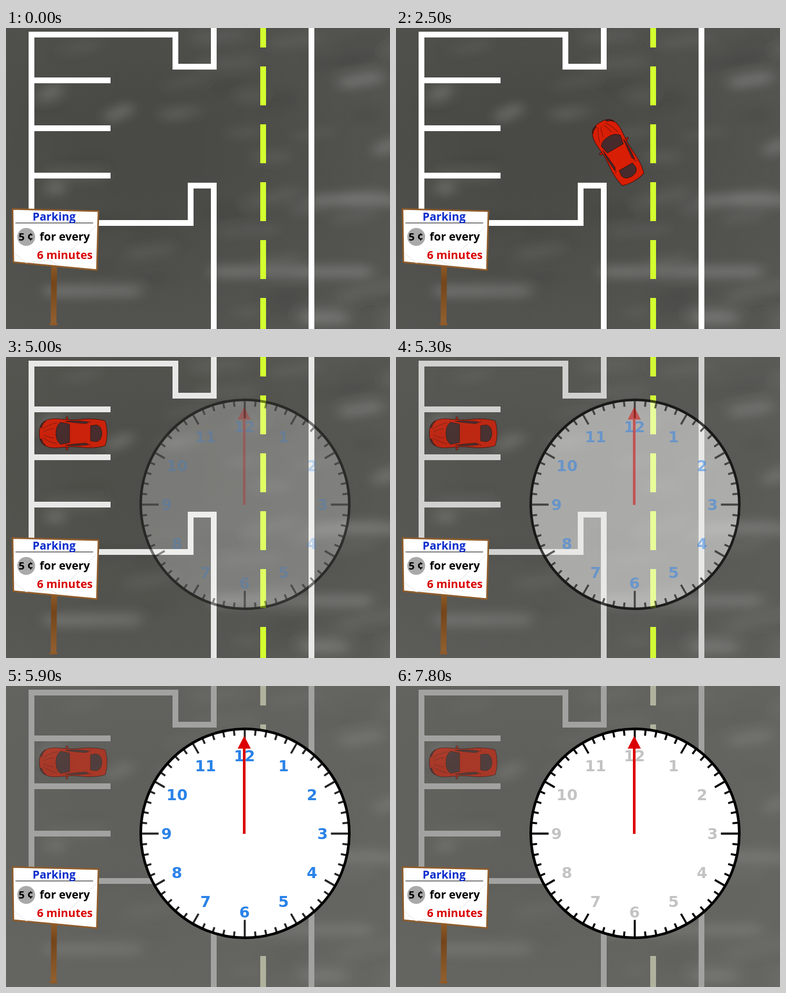
Write an HTML page that moves like this. It is 731x572 px and loops after 8 s.

```html
<!DOCTYPE html>
<html lang="en">
<head>
<meta charset="utf-8">
<title>Parking clock</title>
<style>
html, body { margin: 0; width: 100%; height: 100%; overflow: hidden; background: #4c4c48; }
/* --p: clock fades in; --line, --late: eased forms of it; --q: numbers turn grey */
svg { --p: 0; --line: 0; --late: 0; --q: 0; display: block; width: 100vw; height: 100vh; }

.dim { opacity: calc(var(--p) * .5); }
.lines { fill: none; stroke-width: 11; stroke: color-mix(in srgb, #a2a2a0 calc(var(--p) * 100%), #fff); }
.dashes { stroke-width: 11; stroke-dasharray: 74 36; stroke: color-mix(in srgb, #b0b29e calc(var(--late) * 100%), #d4ff2e); }
.body { opacity: calc(1 - var(--p) * .4); }
.fade { opacity: var(--p); }
.dial { opacity: var(--line); stroke: #000; }
.ticks { stroke-width: 3.8; opacity: calc(.85 + var(--q) * .15); }
.numbers { font: bold 29px "DejaVu Sans", sans-serif; text-anchor: middle; fill: color-mix(in srgb, #c3c3c3 calc(var(--q) * 100%), #2a82e8); }
.sign { font: bold 21.4px "Open Sans", "Noto Sans", sans-serif; }
</style>
</head>
<body>
<svg id="stage" viewBox="0 0 731 572" preserveAspectRatio="none">
  <defs>
    <filter id="soft" filterUnits="userSpaceOnUse" x="-60" y="-60" width="851" height="692">
      <feGaussianBlur stdDeviation="13 9"/>
    </filter>
    <radialGradient id="asphalt" cx=".35" cy=".38" r=".75">
      <stop offset=".2" stop-color="#494945"/>
      <stop offset="1" stop-color="#555552"/>
    </radialGradient>
    <linearGradient id="wood" x2="0" y2="1">
      <stop offset="0" stop-color="#8f5a26"/>
      <stop offset=".3" stop-color="#74451a"/>
      <stop offset="1" stop-color="#93602f"/>
    </linearGradient>
  </defs>

  <rect width="731" height="572" fill="url(#asphalt)"/>
  <g filter="url(#soft)" fill="none" stroke="#fff" stroke-linecap="round">
    <g id="streaks"/>
    <path d="M85 500H245 M400 463H685 M595 327H740 M575 552H640 M645 104L705 94 M712 232L735 220
      M200 168L230 154 M75 128L95 117 M88 305H100" stroke-width="24" opacity=".17"/>
  </g>
  <rect class="dim" width="731" height="572" fill="#767672"/>

  <path class="lines" d="M48.5 370.5V12.5H322.5V73.5H395.5V0 M48.5 370.5H351.5V299.5H395.5V572
    M54 99.5H199 M54 190.5H199 M54 280.5H199 M581.5 0V572"/>
  <path class="dashes" d="M489.5 -37V572"/>

  <g id="car"><g class="body" stroke-linejoin="round">
    <g fill="#d81e05" stroke="#3c0d08">
      <path d="M-24 -9L-31.5 -11L-31 -14L-23 -13Z M24 -9L31.5 -11L31 -14L23 -13Z"/>
      <path d="M0 -64.5C11 -64.5 20 -62 24 -53C28 -44 28.5 -36 27 -24L25.5 -4C25.5 10 28 22 27.5 34
        Q27 50 23.5 61Q12 64.5 0 64.5Q-12 64.5 -23.5 61Q-27 50 -27.5 34C-28 22 -25.5 10 -25.5 -4
        L-27 -24C-28.5 -36 -28 -44 -24 -53C-20 -62 -11 -64.5 0 -64.5Z"/>
    </g>
    <g fill="#472a2b" stroke="#2a0d0b" stroke-width=".8">
      <path d="M-21 -24Q-15 -33 0 -33Q15 -33 21 -24L17.5 -7H-17.5Z"/>
      <path d="M-14.500 33H14.500L16 44Q14 54 0 54.500Q-14 54 -16 44Z"/>
      <path id="glass" d="M22.5 -15Q25 4 21.5 30L18.5 24Q19.5 6 22.5 -15Z"/>
      <use href="#glass" transform="scale(-1 1)"/>
      <path id="lamp" d="M11 -62.5Q20 -61 23 -52L20 -56Q16 -59 11 -60Z"/>
      <use href="#lamp" transform="scale(-1 1)"/>
    </g>
    <g fill="none" stroke="#6d120b" stroke-width=".9">
      <path id="seams" d="M20 -31Q16 -48 8 -58 M9 -37Q8 -48 3 -56 M19 9L25 10 M19 31L25 34"/>
      <use href="#seams" transform="scale(-1 1)"/>
    </g>
  </g></g>

  <g class="sign">
    <path d="M86 450H97L96 564H85Z" fill="url(#wood)"/>
    <ellipse cx="90.5" cy="563" rx="8.5" ry="2.5" fill="#8d5a2a"/>
    <path d="M12.5 344L176 348L173 460L14 445Z" fill="#fff" stroke="#8f5c2a" stroke-width="3" stroke-linejoin="round"/>
    <path d="M173 374L122 424 M16 428L38 446L82 441L100 451" fill="none" stroke="#ececec" stroke-width="1.5"/>
    <path d="M18 370.5H166" stroke="#000"/>
    <circle cx="38.5" cy="397" r="17" fill="#a9a9a9"/>
    <text x="50.5" y="366" fill="#0a2ccc">Parking</text>
    <text x="24" y="404" font-size="20">5 ¢</text>
    <text x="64" y="404">for every</text>
    <text x="59" y="439" fill="#d80000">6 minutes</text>
  </g>

  <circle class="fade" cx="455" cy="280" r="196.5" fill="#fff"/>
  <g class="dial">
    <circle cx="455" cy="280" r="198.5" fill="none" stroke-width="5"/>
    <g class="ticks" id="ticks"/>
  </g>
  <g class="fade"><g class="numbers" id="numbers"/></g>
  <path class="fade" d="M453.5 95L466 119H456V281H451V119H441Z" fill="#dc0000"/>
</svg>
<script>
const stage = document.getElementById("stage");
const car = document.getElementById("car");

const add = (parent, tag, attrs, text = "") => {
  const el = document.createElementNS("http://www.w3.org/2000/svg", tag);
  for (const key in attrs) el.setAttribute(key, attrs[key]);
  el.textContent = text;
  document.getElementById(parent).append(el);
};

let seed = 7;
const random = () => (seed = seed * 16807 % 2147483647) / 2147483647;

// Faint light and dark streaks, rising slightly to the right
for (let i = 0; i < 50; i++) {
  const dx = 30 + 70 * random();
  add("streaks", "path", {
    d: `M${731 * random()} ${572 * random()}l${dx} ${-dx * .25 * random()}`,
    stroke: i % 2 ? "#fff" : "#000", "stroke-width": 14 + 16 * random(), opacity: .06
  });
}

for (let i = 0; i < 60; i++) {
  const length = i % 15 === 0 ? 33 : i % 5 === 0 ? 21 : 10;
  add("ticks", "line", {
    y1: -197, y2: length - 197,
    transform: `translate(454.5 280.5) rotate(${i * 6})`
  });
}

for (let h = 1; h <= 12; h++) {
  const a = h * Math.PI / 6;
  add("numbers", "text", { x: 454 + 148.5 * Math.sin(a), y: 291 - 148.5 * Math.cos(a) }, h);
}

const clamp = (v, max) => Math.max(0, Math.min(max, v));
// Rises from 0 to 1 in four jumps, 300 ms apart
const jumps = (t, start) => clamp(Math.floor((t - start) / 300) + 1, 4) / 4;

const turn = [[442, 340], [421, 235], [349, 167], [261, 145], [128, 145]];

function draw(now) {
  const t = now % 8000;
  const n = clamp(Math.floor(t / 500), 8);
  const [x, y] = n < 4 ? [442, 700 - 90 * n] : turn[n - 4];
  car.setAttribute("transform", `translate(${x} ${y}) rotate(${-30 * clamp(n - 4, 3)})`);

  const p = jumps(t, 5000);
  const levels = { p, line: Math.sqrt(p), late: p ** 4, q: jumps(t, 6900) };
  for (const name in levels) stage.style.setProperty("--" + name, levels[name]);
}

const loop = () => {
  draw(performance.now());
  requestAnimationFrame(loop);
};
loop();
</script>
</body>
</html>
```
